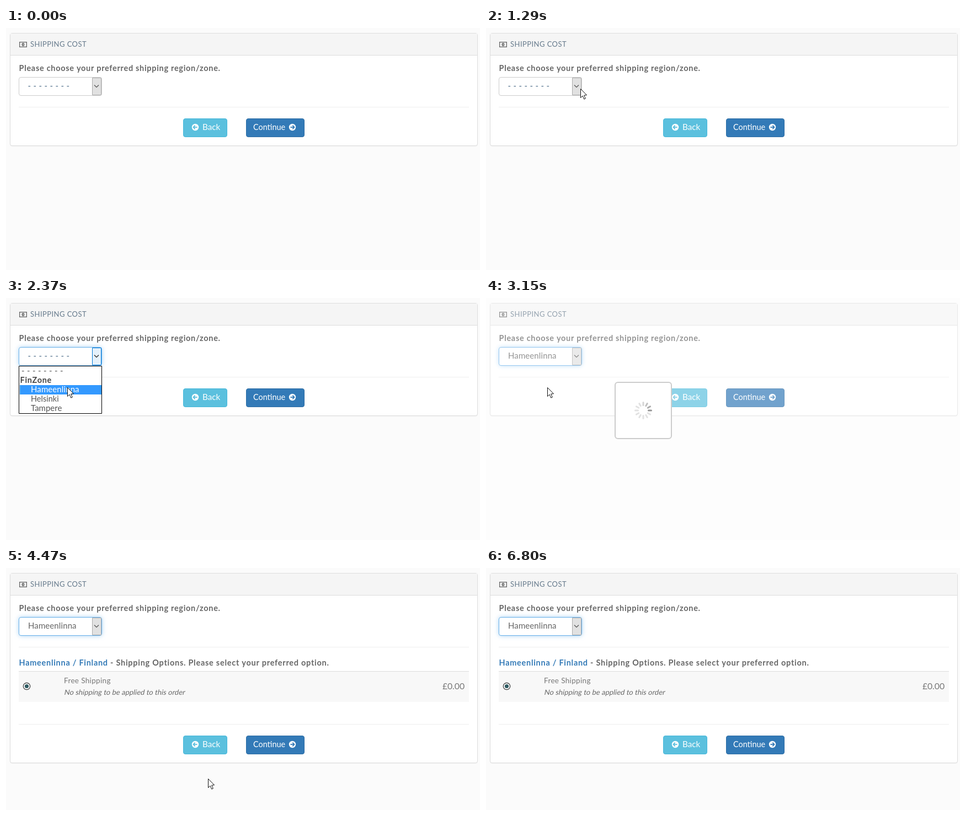
Animation, 859 px wide and 439 px high, one loop 6870 ms. Source, as an HTML page with a canvas:

```html
<!DOCTYPE html>
<html lang="en">
<head>
<meta charset="utf-8">
<title>Shipping cost</title>
<style>
html, body { margin: 0; width: 100%; height: 100%; overflow: hidden; background: #fbfbfb; }
canvas { display: block; width: 859px; height: 439px; }
</style>
</head>
<body>
<canvas id="stage" width="859" height="439"></canvas>
<script>
const ctx = document.getElementById('stage').getContext('2d');
const LOOP = 6870, TICK = 76.5;
const OPEN = 1670, PICKED = 3060, LOADING = 3150, LOADED = 4470;

// Cursor moves: start, steps, end point, steepness of the S-curve
const START = [286, 261];
const MOVES = [
  [580, 1, 195, 216, 1],
  [830, 7, 171, 110, 2],
  [1910, 7, 111, 162, 2],
  [3770, 8, 366, 382, 8],
  [5410, 3, 660, 409, 1.5],
  [5800, 3, 790, 446, 1]
];

function text(str, x, y, size, color, o = {}) {
  ctx.save();
  ctx.font = `${o.bold ? 'bold ' : ''}${size}px Lato, "Open Sans", sans-serif`;
  ctx.letterSpacing = (o.gap || 0) + 'px';
  ctx.textAlign = o.align || 'left';
  ctx.fillStyle = color;
  ctx.translate(x, y);
  if (o.slant) ctx.transform(1, 0, -0.2, 1, 0, 0);
  ctx.fillText(str, 0, 0);
  ctx.restore();
}

// Only the fill casts a shadow, so the border does not double it
function box(x, y, w, h, r, fill, stroke, line = 1) {
  ctx.beginPath();
  ctx.roundRect(x + line / 2, y + line / 2, w - line, h - line, r);
  ctx.fillStyle = fill;
  ctx.fill();
  if (!stroke) return;
  ctx.shadowColor = 'transparent';
  ctx.strokeStyle = stroke;
  ctx.lineWidth = line;
  ctx.stroke();
}

function rect(x, y, w, h, color) {
  ctx.fillStyle = color;
  ctx.fillRect(x, y, w, h);
}

function disc(x, y, r, color) {
  ctx.beginPath();
  ctx.arc(x, y, r, 0, Math.PI * 2);
  ctx.fillStyle = color;
  ctx.fill();
}

function polyline(points, color, width) {
  ctx.beginPath();
  points.forEach(([x, y]) => ctx.lineTo(x, y));
  ctx.strokeStyle = color;
  ctx.lineWidth = width;
  ctx.stroke();
}

function panel(height) {
  rect(0, 0, 859, 439, '#fbfbfb');
  ctx.save();
  ctx.shadowColor = 'rgba(0,0,0,.08)';
  ctx.shadowOffsetY = 1;
  ctx.shadowBlur = 1;
  box(7, 9, 848, height, 3.5, '#fff', '#ddd');
  ctx.restore();
  rect(8, 10, 846, 39, '#f5f5f5');
  rect(8, 49, 846, 1, '#ddd');

  box(24, 25, 14, 10, 0, '#f5f5f5', '#666', 1.3);
  ctx.beginPath();
  ctx.ellipse(31, 30, 2.4, 3, 0, 0, Math.PI * 2);
  ctx.fillStyle = '#666';
  ctx.fill();
  rect(30.6, 28.4, 1, 3.2, '#f5f5f5');
  text('SHIPPING COST', 44, 34, 13, '#667a8c', { gap: .45 });
  text('Please choose your preferred shipping region/zone.', 23.5, 78, 14.5, '#666', { bold: true, gap: .69 });
}

function select(t) {
  const focus = t >= 1590, hot = focus && t < PICKED;
  ctx.save();
  if (focus) {
    ctx.shadowColor = 'rgba(102,175,233,.6)';
    ctx.shadowBlur = 8;
  }
  box(23, 89, 151, 34, 3.5, '#fff', focus ? '#66afe9' : '#ccc');
  ctx.restore();
  box(156, 90, 17, 32, 0, hot ? '#e5f1fb' : '#e1e1e1', hot ? '#0078d7' : '#adadad');
  polyline([[160, 103.5], [164, 107.5], [168, 103.5]], hot ? '#222' : '#555', 1.2);
  if (t < PICKED) text('- - - - - - - -', 39.5, 110, 15, '#4a6b87', { gap: .3 });
  else text('Hameenlinna', 40, 110, 15, '#666', { gap: .1 });
}

function menu(t, cursorY) {
  box(23, 123, 151, 87, 0, '#fff', '#000');
  const hover = t >= 1910 && cursorY >= 158;
  if (t >= 1750) rect(25, hover ? 158 : 124, 148, 17, '#3399ff');
  const shade = on => on ? '#fff' : '#555';
  text('- - - - - - - -', 28, 137, 15, shade(t >= 1750 && !hover), { gap: .3 });
  text('FinZone', 25.5, 154, 14.5, '#444', { bold: true, gap: .7 });
  text('Hameenlinna', 45, 171, 15, shade(hover), { gap: .1 });
  text('Helsinki', 45, 188, 14.5, '#555');
  text('Tampere', 45, 205, 15, '#555');
}

function arrowIcon(x, y, dir, color) {
  disc(x, y, 6.2, '#fff');
  polyline([[x - 3.6 * dir, y], [x + 3 * dir, y]], color, 1.8);
  polyline([[x + .3 * dir, y - 3.3], [x + 3.5 * dir, y], [x + .3 * dir, y + 3.3]], color, 1.8);
}

function buttons(y) {
  rect(23, y - 21, 816, 1, '#eee');
  box(321, y, 80, 34, 3.5, '#5bc0de', '#46b8da');
  arrowIcon(343, y + 16, -1, '#5bc0de');
  text('Back', 356, y + 21, 15.2, '#fff');
  box(435, y, 106, 34, 3.5, '#337ab7', '#2e6da4');
  text('Continue', 448, y + 21, 14.4, '#fff');
  arrowIcon(519, y + 16, 1, '#337ab7');
}

function options() {
  rect(23, 143, 816, 1, '#eee');
  text('Hameenlinna / Finland', 23.5, 177, 14.5, '#337ab7', { bold: true, gap: .71 });
  text('- Shipping Options. Please select your preferred option.', 189, 177, 14.5, '#666', { bold: true, gap: .73 });
  rect(23, 187, 816, 56, '#f8f8f8');
  rect(23, 187, 816, 1, '#ddd');
  disc(37.5, 214.5, 6.8, '#333');
  disc(37.5, 214.5, 5.6, '#fff');
  disc(37.5, 214.5, 3.6, '#2f5b62');
  text('Free Shipping', 105, 209, 13.5, '#777', { gap: .35 });
  text('No shipping to be applied to this order', 105, 230, 13, '#666', { slant: true });
  text('£0.00', 831, 220, 15.7, '#777', { align: 'right' });
}

function loader(t) {
  rect(0, 0, 859, 439, 'rgba(255,255,255,.3)');
  box(233, 152, 104, 104, 5, '#fff', '#ccc', 2);
  const shown = Math.floor((t - LOADING) / TICK) * TICK;
  const head = 3 + Math.floor((shown + 28) / 97);
  ctx.save();
  ctx.translate(285, 204);
  ctx.lineCap = 'round';
  for (let i = 0; i < 12; i++) {
    const age = (head - i + 24) % 12;
    const g = Math.min(226, 150 + age * 21);
    ctx.save();
    ctx.rotate(i * Math.PI / 6);
    polyline([[0, -9.5], [0, -14.5]], `rgb(${g},${g},${g})`, 3);
    ctx.restore();
  }
  ctx.restore();
}

function cursorAt(t) {
  let [x, y] = START;
  for (const [start, steps, toX, toY, power] of MOVES) {
    if (t < start) break;
    const p = Math.min(1, (Math.floor((t - start) / TICK) + 1) / steps);
    const a = p ** power, e = a / (a + (1 - p) ** power);
    x += (toX - x) * e;
    y += (toY - y) * e;
  }
  return [Math.round(x), Math.round(y)];
}

function cursor(x, y) {
  ctx.save();
  ctx.translate(x + .5, y + .5);
  ctx.beginPath();
  [[0, 0], [0, 16], [3.6, 12.6], [6.2, 18.6], [8.8, 17.5], [6.2, 11.6], [11, 11.2]]
    .forEach(([px, py]) => ctx.lineTo(px, py));
  ctx.closePath();
  ctx.fillStyle = '#fff';
  ctx.fill();
  ctx.strokeStyle = '#111';
  ctx.lineWidth = 1;
  ctx.stroke();
  ctx.restore();
}

function draw(t) {
  const loaded = t >= LOADED;
  const [x, y] = cursorAt(t);
  panel(loaded ? 345 : 205);
  select(t);
  if (loaded) options();
  buttons(loaded ? 304 : 164);
  if (t >= OPEN && t < PICKED) menu(t, y);
  if (t >= LOADING && !loaded) loader(t);
  if (t >= 510 && t < 5950) cursor(x, y);
}

const began = performance.now();
function tick() {
  draw((performance.now() - began) % LOOP);
  requestAnimationFrame(tick);
}
tick();
</script>
</body>
</html>
```
